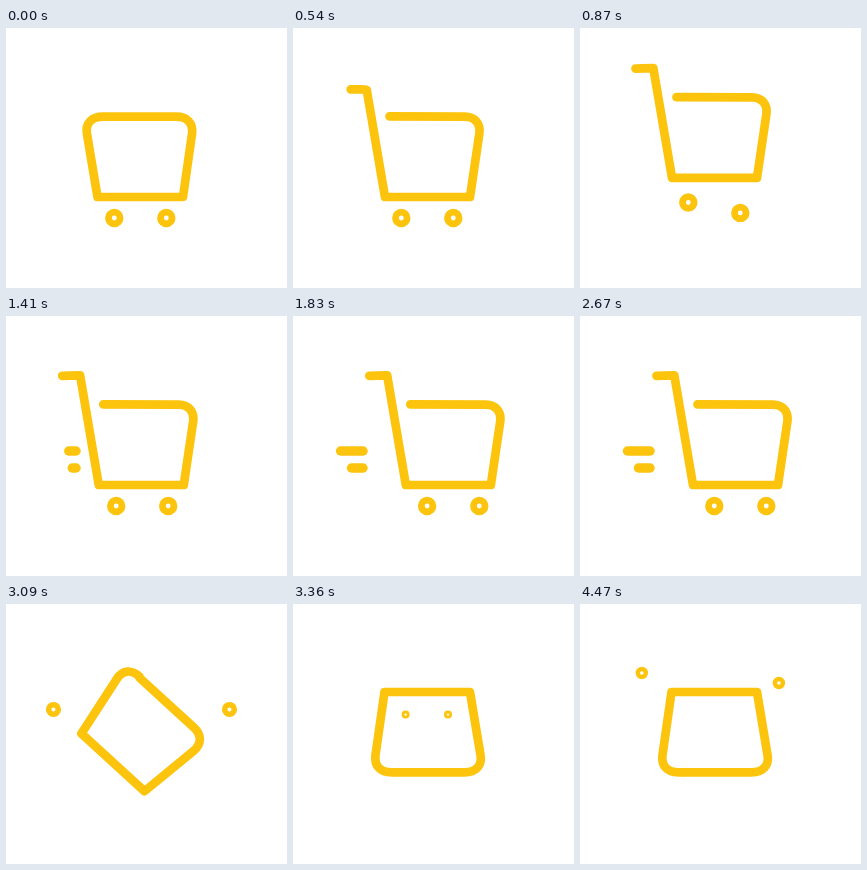
These frames come from a looping animation (281 px wide and 260 px high, 4.5 s). An HTML page:

```html
<!DOCTYPE html>
<html lang="en">
<head>
<meta charset="utf-8">
<title>Cart to bag</title>
<style>
  html, body { margin: 0; width: 100%; height: 100%; overflow: hidden; background: #fff; }
  svg { display: block; width: 281px; height: 260px; }
  svg * {
    animation-duration: 4.5s;
    animation-timing-function: ease-in-out;
    animation-iteration-count: infinite;
  }
  path, circle { fill: none; stroke: #fcc40c; stroke-linecap: round; stroke-linejoin: round; }

  /* The jump runs through the parts one after another */
  .hop { animation-name: hop; }
  .hop.left { animation-delay: .12s; }
  .hop.right { animation-delay: .22s; }

  .body {
    stroke-width: 8.7;
    transform-origin: 134.25px 128.5px;
    animation-name: morph, dash, turn;
  }
  .wheel { r: 5.8px; stroke-width: 6.8px; cy: 190px; }
  .left .wheel { cx: 108.3px; animation-name: left-x, left-y, size; }
  .right .wheel { cx: 160.3px; animation-name: right-x, right-y, size; }
  .speed { stroke-width: 9.5; animation-name: streak; }

  @keyframes hop {
    0%, 12.11% { translate: 0 0; }
    18.78% { translate: 0 -19.5px; }
    25.44%, 100% { translate: 0 0; }
  }

  /* Closed basket, cart with handle, closed again */
  @keyframes morph {
    0%, 5.33%, 69.33%, 100% {
      d: path("M97 88.6 L170 88.6 C181 88.6 187.5 95 186 106 L177 169 L91.5 169 L81 106 C79 95 86 88.6 97 88.6");
    }
    13.33%, 64% {
      d: path("M96.5 88.4 L172 88.6 C182 88.6 188 96 186.3 106 L177 169 L92 169 L73.3 59.3 C73.3 59.3 61 59.7 55.5 59.8");
    }
  }
  @keyframes dash {
    0%, 30% { translate: 0 0; }
    40% { translate: 21px 0; }
    50.67% { translate: 1.5px 0; }
    59.11%, 61.33% { translate: 21px 0; }
    66.67%, 100% { translate: 0 0; }
  }
  @keyframes turn {
    0%, 66% { rotate: 0deg; }
    74%, 100% { rotate: 180deg; }
  }
  @keyframes streak {
    0%, 29.99% { stroke-dasharray: 0 2; opacity: 0; }
    30% { stroke-dasharray: 0 2; opacity: 1; }
    31.33% { stroke-dasharray: .32 2; }
    40% { stroke-dasharray: 1 2; }
    50.67% { stroke-dasharray: .21 2; }
    59.11%, 61.33% { stroke-dasharray: 1 2; }
    65.56% { stroke-dasharray: 0 2; opacity: 1; }
    65.57%, 100% { stroke-dasharray: 0 2; opacity: 0; }
  }

  @keyframes left-x {
    0%, 29.33% { cx: 108.3px; }
    40% { cx: 134.3px; }
    51.11% { cx: 110.3px; }
    59.33%, 60% { cx: 134.3px; }
    65.33% { cx: 108.3px; }
    69.1% { cx: 46px; }
    74%, 92% { cx: 112.6px; }
    99.33%, 100% { cx: 61.8px; }
  }
  @keyframes right-x {
    0%, 29.33% { cx: 160.3px; }
    40%, 42% { cx: 186.3px; }
    53.11% { cx: 162.3px; }
    59.33%, 60% { cx: 186.3px; }
    65.33% { cx: 160.3px; }
    69.1% { cx: 225px; }
    74%, 92% { cx: 155px; }
    99.33%, 100% { cx: 198.9px; }
  }
  @keyframes left-y {
    0%, 65.33% { cy: 190px; }
    71.56% { cy: 41px; }
    74.5% { cy: 110.6px; }
    92% { cy: 110.6px; animation-timing-function: ease-out; }
    96.67% { cy: 57px; animation-timing-function: ease-in; }
    99.33%, 100% { cy: 69px; }
  }
  @keyframes right-y {
    0%, 65.33% { cy: 190px; }
    71.56% { cy: 41px; }
    74.5% { cy: 110.6px; }
    92% { cy: 110.6px; animation-timing-function: ease-out; }
    96% { cy: 57px; animation-timing-function: ease-in; }
    99.33%, 100% { cy: 79px; }
  }
  @keyframes size {
    0%, 65.33% { r: 5.8px; stroke-width: 6.8px; }
    74%, 92% { r: 2.6px; stroke-width: 2.8px; }
    99.33%, 100% { r: 4px; stroke-width: 4.4px; }
  }
</style>
</head>
<body>
<svg viewBox="0 0 281 260">
  <path class="speed" pathLength="1" d="M70 135H47.5"/>
  <path class="speed" pathLength="1" d="M70 152H58.5"/>
  <g class="hop"><path class="body"/></g>
  <g class="hop left"><circle class="wheel"/></g>
  <g class="hop right"><circle class="wheel"/></g>
</svg>
</body>
</html>
```
